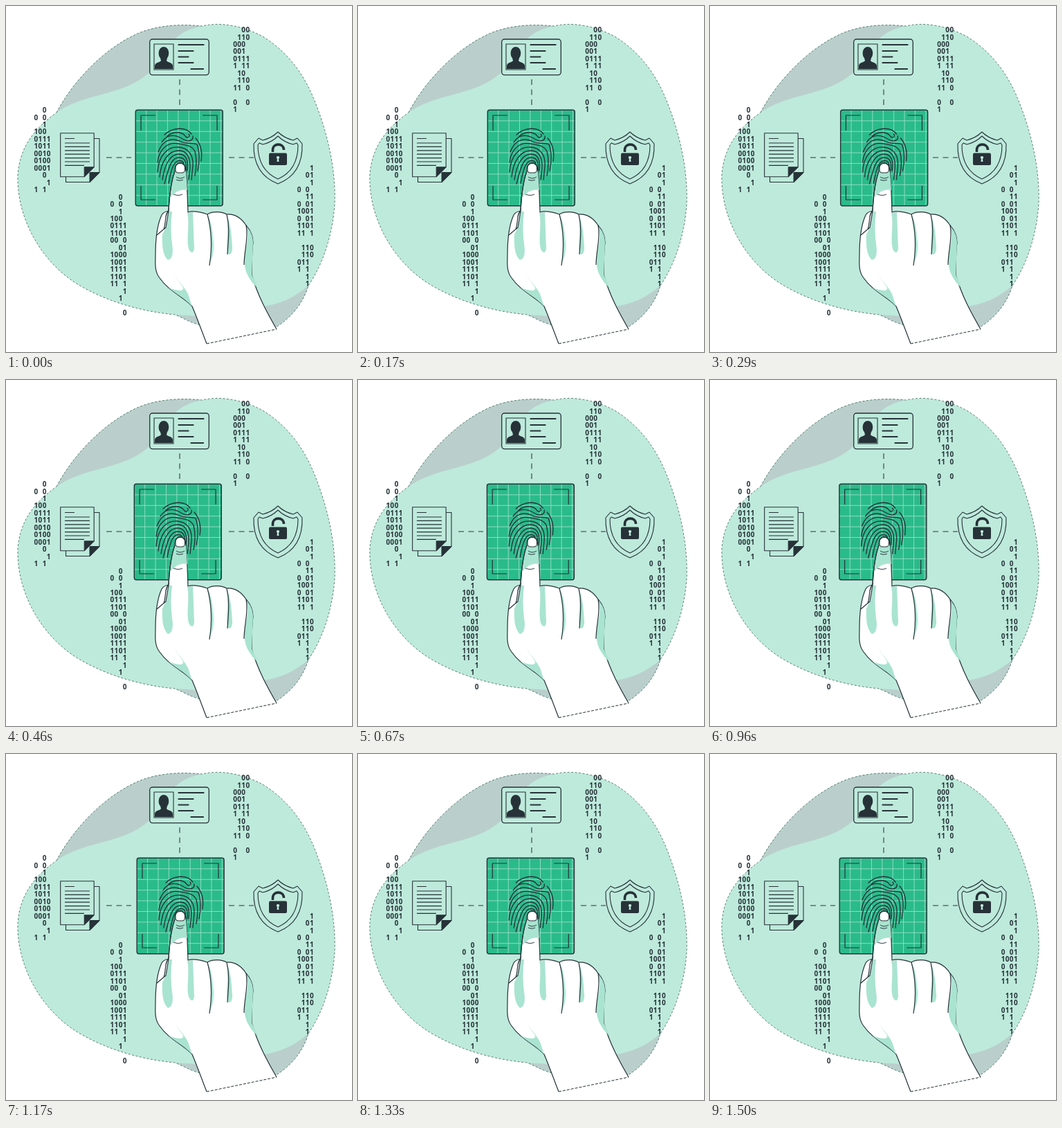
An HTML page with a canvas for the animation above (1540 ms loop, 500 by 500 pixels).

```html
<!DOCTYPE html>
<html lang="en">
<head>
<meta charset="utf-8">
<title>Fingerprint scan</title>
<style>
  html, body { margin: 0; width: 100%; height: 100%; overflow: hidden; background: #fff; }
  canvas { display: block; width: 500px; height: 500px; }
</style>
</head>
<body>
<canvas id="stage" width="500" height="500"></canvas>
<script>
const ctx = document.getElementById('stage').getContext('2d');
const INK = '#263238', MINT = '#beeadb', GREY = '#bacfcb', GREEN = '#2abb8a', SHADE = '#a9e4d0';
const LOOP = 1540, FPS = 24;

function shape(d, fill, stroke, width = 1.3) {
  const path = new Path2D(d);
  if (fill) { ctx.fillStyle = fill; ctx.fill(path); }
  if (stroke) { ctx.strokeStyle = stroke; ctx.lineWidth = width; ctx.stroke(path); }
}
const line = (d, width = 1.2, color = INK) => shape(d, null, color, width);

function box(x, y, w, h, r, fill, stroke, width = 1.4) {
  ctx.beginPath();
  ctx.roundRect(x, y, w, h, r);
  if (fill) { ctx.fillStyle = fill; ctx.fill(); }
  if (stroke) { ctx.strokeStyle = stroke; ctx.lineWidth = width; ctx.stroke(); }
}

function dashed(d, pattern, width, color) {
  ctx.setLineDash(pattern);
  line(d, width, color);
  ctx.setLineDash([]);
}

const CROWN = 'M73 154C95 112 139 62 192 39C222 27 255 26 283 29';
const OUTLINE = CROWN + 'C312 22 345 30 371 44C407 66 431 99 446 137C464 182 477 235 475 286' +
  'C472 331 458 373 437 404C430 428 413 451 387 466L285 462C268 459 257 451 244 446' +
  'C190 441 137 424 97 398C49 365 16 306 17 246C19 207 38 179 73 154Z';

function background() {
  shape(OUTLINE, MINT);
  shape(CROWN + 'C258 34 241 45 228 69C217 88 205 101 184 112C150 129 105 131 73 154Z', GREY);
  shape('M437 404C430 428 413 451 387 466L366 435C395 432 418 421 437 404Z', GREY);
  shape('M244 446L275 448L290 462C270 460 257 451 244 446Z', GREY);
  dashed(OUTLINE, [3, 2.5], 0.8, '#3d6558');
}

const codes = [
  [331, 34.5, ['  00', ' 110', '000', '001', '0111', '1 11', ' 10', ' 110', '11 0', '', '0  0', '1']],
  [43.3, 150.5, ['  0', '0 0', '  1', '100', '0111', '1011', '0010', '0100', '0001', '  0', '   1', '1 1']],
  [153.3, 276, ['  0', '0 0', '  1', '100', '0111', '1101', '00 0', '  01', '1000', '1001', '1111', '1101', '11 1', '   1', '  1', '', '   0']],
  [423.5, 234, ['   1', '  01', '   1', '0 0', '  11', '0 01', '1001', '0 01', '1101', '11 1', '', ' 110', ' 110', '011', '1 1', '  1', '  1']]
];

function digits() {
  ctx.font = '600 extra-condensed 10px "Noto Sans", "Open Sans", Roboto, sans-serif';
  ctx.textAlign = 'center';
  ctx.textBaseline = 'alphabetic';
  ctx.fillStyle = INK;
  for (const [x, y, rows] of codes)
    rows.forEach((row, j) => [...row].forEach((c, i) => {
      if (c !== ' ') ctx.fillText(c, x + i * 6.1, y + j * 10.46 + 3.6);
    }));
}

function idCard() {
  box(207.7, 48, 85.6, 51.6, 4, MINT, INK, 1.3);
  box(214, 55, 28, 37, 0, null, INK, 1.1);
  shape('M215 91V86C216 81 222 82 224 79L223 75C219 71 220 59 228 59C236 59 237 71 233 75L232 79C234 82 240 81 241 86V91Z', INK);
  ctx.lineCap = 'round';
  line('M249.500 56H285.500M249.500 65H270.500M249.500 73.500H263.500M249.500 82H270.500M267.500 91H285', 2.2);
  ctx.lineCap = 'butt';
}

function sheet(x, y) {
  ctx.save();
  ctx.translate(x, y);
  shape('M0 0H48.500V49L34.500 63H0Z', MINT, INK, 1.1);
  shape('M34.500 63V49H48.500Z', INK, INK, 1);
  ctx.restore();
}

function documents() {
  sheet(86.5, 191.5);
  sheet(78.7, 183.8);
  let d = 'M85 191.500H99';
  for (let i = 0; i < 7; i++) d += `M85 ${198 + i * 5.4}H${i === 6 ? 113 : 121}`;
  line(d);
}

function shield() {
  shape('M393 182C386 189 379 192 371 194L365 191L358 199C357 229 370 248 393 257C416 248 429 229 428 199L421 191L415 194C407 192 400 189 393 182Z', MINT, INK, 1.1);
  line('M393 188C386 195 380 198 371 200L366 198L364 201C364 226 375 242 393 250C411 242 422 226 422 201L420 198L415 200C406 198 400 195 393 188Z', 1.1);
  box(380, 212.5, 26, 17.5, 2, INK);
  line('M385.500 211V208C385.500 197.500 401.500 197.500 401.500 208', 3.6);
  shape('M393 217a2 2 0 0 1 1 3.800L394.500 225H391.500L392 220.800A2 2 0 0 1 393 217Z', MINT);
}

const ridges = [
  'M229 186C241 175 260 174 268 185',
  'M233 188C243 180 255 182 259 188C262 192 267 189 264 185',
  'M225 197C233 184 246 186 255 192C263 197 271 195 270 188',
  'M274 191C281 199 284 211 282 224',
  'M220 211C227 192 241 190 253 196C261 200 269 197 276 200C280 211 280 226 277 238',
  'M219 226C221 205 236 196 249 199C262 201 269 202 273 210C276 222 275 235 273 245',
  'M219 240C220 217 233 203 249 204C264 205 271 216 270 231L268 251',
  'M222 247C224 224 235 208 251 209C263 210 267 221 265.500 237L264 251',
  'M226 251C229 230 237 213 251 214C261 215 264 225 262 238',
  'M229 257C235 233 239 218 251 219C260 219.500 261 228 260 238',
  'M235 256C239 234 243 223 251.500 223.500C257 224 258 229 257 235'
].join('');

function panel(dx) {
  ctx.save();
  ctx.translate(dx, 0);
  box(187.2, 150.2, 126, 138.6, 3, GREEN, INK, 1.4);
  let grid = '';
  for (let i = 1; i <= 8; i++) {
    const step = i * 15.4;
    grid += `M${187.2 + step} 151V288M188 ${150.5 + step}H312.500`;
  }
  line(grid, 0.9, '#9adfc7');
  line('M195 180V158H216M284 158H305V180M195 260V280H216M284 280H305V260');
  ctx.lineCap = 'round';
  line(ridges, 1.35);
  ctx.lineCap = 'butt';
  ctx.restore();
}

function hand() {
  const contour = 'M290 488C283 470 277 453 269 434C256 420 235 412 222 393' +
    'C214 383 216 370 216 359C216 340 218 317 225 302C228 297 232 297 235 296C236 277 238 255 244 239' +
    'C243 222 260 222 260 239L262 270L263 298C272 295 282 298 291 301C299 296 312 297 319 301C332 300 341 308 347 317' +
    'C353 324 357 332 357 342C355 356 355 374 355 388C364 420 379 446 391 467';
  ctx.lineJoin = 'round';
  shape(contour, '#fff', INK, 1.2);
  dashed('M290 488L391 467', [4, 2], 1, INK);
  // Shadows
  shape('M244 240L260 240L262 266C254 264 246 267 238 276C239 262 240 251 244 240Z', SHADE);
  shape('M235 297L231 320L226 330C225 347 227 361 234 367C241 366 242 355 240 344C238 329 238 312 240 297Z', SHADE);
  shape('M262 299C266 315 260 337 264 351C267 358 272 358 272 349C271 331 271 316 270 298Z', SHADE);
  shape('M291 302C296 320 297 345 295 371C300 361 301 348 299 334C298 319 296 309 291 302Z', SHADE);
  shape('M319 302C323 319 317 340 320 356C323 362 327 358 327 349C326 331 325 315 319 302Z', SHADE);
  shape('M347 318C352 330 348 342 346 356C343 370 345 383 351 392C355 400 361 404 365 410L355 388L357 342C357 332 353 324 347 318Z', SHADE);
  shape('M239 374C241 391 256 402 263 416L269 434C257 421 244 415 235 407C248 412 257 413 256 407C250 397 241 388 239 374Z', SHADE);
  // Contours
  line('M244 239C238 256 236 277 235 296L231 320L218 331M235 296C229 301 232 310 228 323');
  line('M291 301C297 323 298 350 294 375M319 301C324 323 321 340 320 359M347 317C351 334 344 354 344 374');
  line('M242 272C247 274 251 274 255 272M246 247C250 250 255 249 258 247M246 251C250 253 254 252 256 251', 1);
  box(245, 227.5, 13.5, 13.5, [6, 6, 4, 4], '#fff', INK, 1.1);
}

// Horizontal shake: offsets at every tenth of a 1.5 s cycle.
const SHAKE = [0, -1, 2, -4, 4, -4, 4, -4, 2, -1, 0];
function shakeAt(ms) {
  const pos = ((ms + 27) % 1500) / 150;
  const i = Math.floor(pos);
  return SHAKE[i] + (SHAKE[i + 1] - SHAKE[i]) * (pos - i);
}

function draw(now) {
  const step = Math.floor((now % LOOP + 9.9) * FPS / 1000);
  ctx.fillStyle = '#fff';
  ctx.fillRect(0, 0, 500, 500);
  background();
  digits();
  idCard();
  documents();
  shield();
  dashed('M251 106V143M145 219H181M322 219H358', [8, 6.5], 1.05, INK);
  panel(shakeAt(step * 1000 / FPS) + 0.2);
  hand();
}

const start = performance.now();
function tick() {
  draw(performance.now() - start);
  requestAnimationFrame(tick);
}
tick();
</script>
</body>
</html>
```
